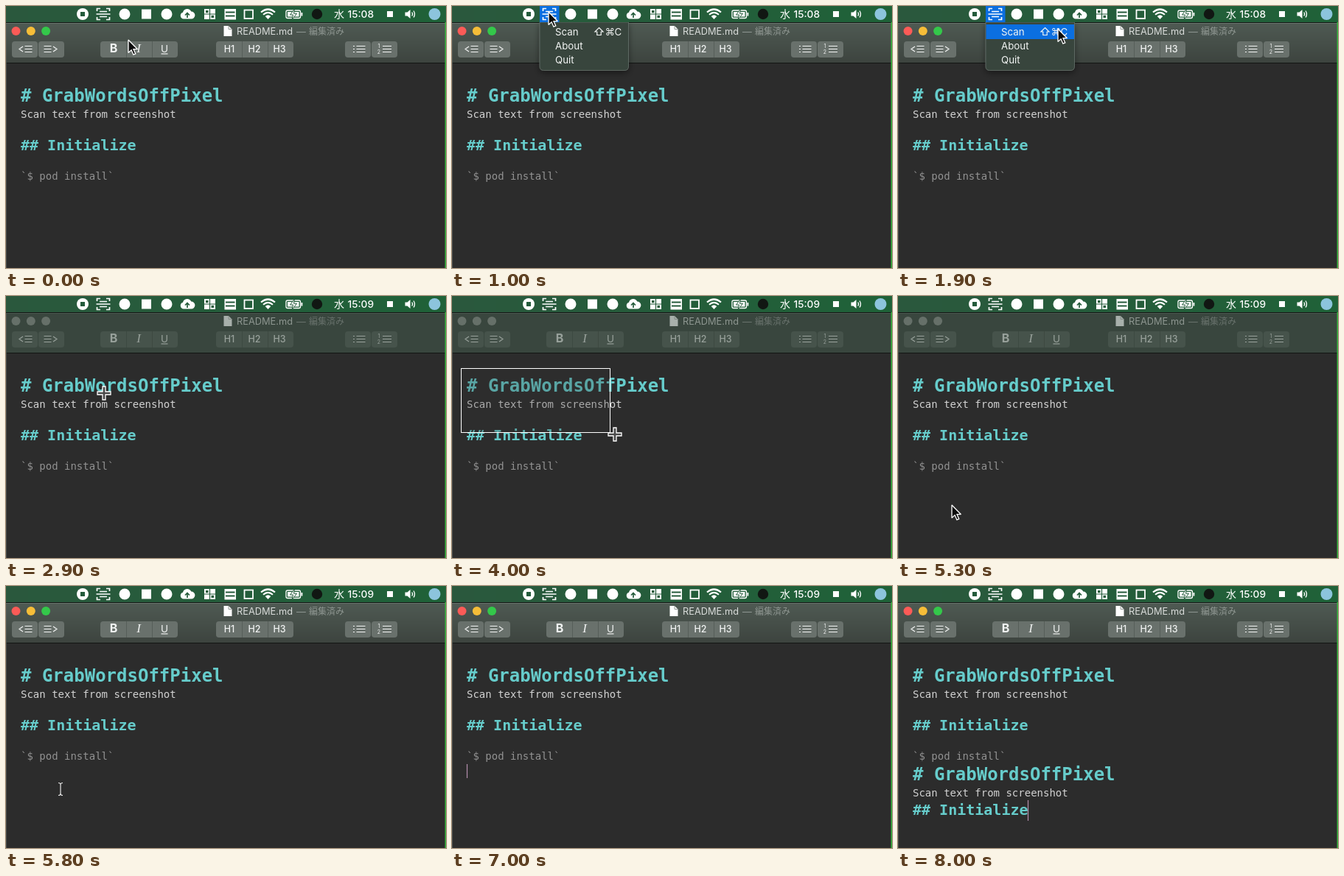
An HTML page for the animation above (8200 ms loop, 597 px wide and 356 px high).

```html
<!DOCTYPE html>
<html lang="ja">
<head>
<meta charset="utf-8">
<title>Screen capture demo</title>
<style>
html, body { margin: 0; width: 100%; height: 100%; overflow: hidden; background: #2c2c2c; }
svg { display: block; width: 597px; height: 356px; }
text { white-space: pre; }
.ui { font-family: Inter, "Noto Sans CJK JP", "Noto Sans CJK", sans-serif; }
.doc { font-family: "DejaVu Sans Mono", monospace; }
.h1 { font-size: 24px; font-weight: 700; fill: #66cccb; }
.h2 { font-size: 20px; font-weight: 700; fill: #66cccb; }
.p { font-size: 14px; fill: #d2d2d2; }
.code { font-size: 14px; fill: #929292; }
#win { --ink: #f1f3f2; --btn: #69716c; --title: #d9dcda; --note: #8e9691; --sep: #565e59; --page: #fff; --shine: #69746d; }
#win.idle { --ink: #98a19b; --btn: #46534b; --title: #8d9690; --note: #68726c; --sep: #3d4941; --page: #a8b0ab; --shine: #4a574f; }
.btn { fill: var(--btn); }
.ink { fill: var(--ink); }
.thin { fill: none; stroke: var(--ink); stroke-width: 1.2; }
.sep { stroke: var(--sep); }
.mid { text-anchor: middle; }
</style>
</head>
<body>
<svg viewBox="0 0 597 356" xmlns="http://www.w3.org/2000/svg">
  <defs>
    <filter id="soft" x="-20%" y="-20%" width="140%" height="150%">
      <feDropShadow dx="0" dy="3" stdDeviation="4" flood-opacity=".45"/>
    </filter>
  </defs>

  <g id="win">
    <rect y="22" width="597" height="334" fill="#2c2c2c"/>
    <rect y="22" width="597" height="55" fill="#39463e"/>
    <g id="titleFill"></g>
    <path d="M0 22.5H597M0 77.5H597" stroke="#121513"/>
    <path d="M0 23.5H597" stroke="var(--shine)"/>
    <path d="M.5 24V356" stroke="#555b57" opacity=".7"/>
    <path d="M596.3 22V356" stroke="#35b63c" stroke-width="1.4"/>
    <g id="lights"></g>
    <path d="M295.5 27H302L306.5 31.5V41H295.5Z" fill="var(--page)"/>
    <path d="M302 27V31.5H306.5" fill="none" stroke="#7c857f" stroke-width=".8"/>
    <g class="ui" font-size="12.8">
      <text x="313" y="38.5" fill="var(--title)">README.md</text>
      <text x="394" y="38.5" fill="var(--note)">—</text>
      <text x="411" y="38.5" font-size="12" fill="var(--note)">編集済み</text>
    </g>
    <g id="tools"></g>
  </g>

  <g id="page" class="doc"></g>
  <g id="pasted" class="doc"></g>
  <path id="caret" stroke="#b58fae" stroke-width="1.2"/>

  <g id="menu" class="ui" font-size="13.3" fill="#f2f4f3">
    <path d="M119 22H239.5V82Q239.5 87.5 234 87.5H124.5Q119 87.5 119 82Z" fill="#38443d" stroke="#68736c" stroke-width=".8" filter="url(#soft)"/>
    <rect id="pick" x="119.5" y="25" width="119.5" height="20" fill="#0b6fe0"/>
    <text x="140" y="39.5">Scan</text>
    <text x="140" y="59">About</text>
    <text x="140" y="78">Quit</text>
    <path d="M199.5 29.5L205 35H202.2V39.5H196.8V35H194Z" fill="none" stroke="#f2f4f3" stroke-width="1.2"/>
    <text x="207.5" y="39.5" style="font-family:'DejaVu Sans',sans-serif">⌘</text>
    <text x="220.5" y="39.5">C</text>
  </g>

  <g id="barFill"></g>
  <rect id="glow" x="119" width="26.5" height="22" fill="#0b6fe0"/>
  <g id="icons" fill="#fff"></g>
  <g class="ui" fill="#fff" font-weight="500">
    <text x="445" y="16" font-size="14">水</text>
    <text id="clock" x="463.5" y="16" font-size="13.7"></text>
  </g>

  <rect id="box" x="12.5" y="98.5" fill="#303030" fill-opacity=".25" stroke="#fff"/>
  <path id="arrow" d="M0 0V17.5L4.1 13.8 6.9 20.2 9.8 18.9 7 12.7H12.5Z" fill="#0c0c0c" stroke="#fff" stroke-width="1.3" stroke-miterlimit="2"/>
  <path id="cross" d="M-2-9H2V-2H9V2H2V9H-2V2H-9V-2H-2Z" fill="#4a4a4a" stroke="#fff" stroke-width="1.3"/>
  <path id="beam" d="M-3-8.5Q0-8.5 0-6V6Q0 8.5-3 8.5M3-8.5Q0-8.5 0-6M0 6Q0 8.5 3 8.5" fill="none" stroke="#e6e6e6" stroke-width="1.2"/>
</svg>

<script>
const $ = id => document.getElementById(id);
const LOOP = 8200, STEP = 100;
const NAME = '# GrabWordsOffPixel';
const LEAD = 'Scan text from screenshot';
const PART = '## Initialize';

const circle = (x, y, r, extra = '') => `<circle cx="${x}" cy="${y}" r="${r}" ${extra}/>`;
const rect = (x, y, w, h, extra = '') => `<rect x="${x}" y="${y}" width="${w}" height="${h}" ${extra}/>`;
const path = (d, extra = '') => `<path d="${d}" ${extra}/>`;
const stroke = (w, color = '#fff') => `fill="none" stroke="${color}" stroke-width="${w}"`;
const words = (cls, y, s) => `<text class="${cls}" x="20" y="${y}">${s}</text>`;

// Stepped colour ramp made of n bands
function ramp(n, from, to, band) {
  return Array.from({ length: n }, (_, i) => {
    const rgb = from.map((c, k) => Math.round(c + (to[k] - c) * i / (n - 1)));
    return band(i, `fill="rgb(${rgb})"`);
  }).join('');
}
$('titleFill').innerHTML = ramp(55, [79, 90, 83], [61, 68, 63], (i, fill) => rect(0, 22 + i, 597, 1, fill));
$('barFill').innerHTML = ramp(20, [42, 88, 61], [31, 98, 56], (i, fill) => rect(30 * i, 0, 30, 22, fill));

$('page').innerHTML = words('h1', 130, NAME) + words('p', 152, LEAD) +
  words('h2', 196, PART) + words('code', 236, '`$ pod install`');
$('pasted').innerHTML = words('h1', 264, NAME) + words('p', 286, LEAD) + words('h2', 311, PART);

// Toolbar
const button = (x, w) => rect(x, 48, w, 22, 'rx="4" class="btn"');
const label = (x, s, style, y = 62.5) => `<text class="ui ink mid" x="${x}" y="${y}" style='${style}'>${s}</text>`;
const bars = (x, w) => [54.5, 58.5, 62.5].map(y => `M${x} ${y}h${w}`).join('');
const split = x => path(`M${x} 48V70`, 'class="sep"');
const ink = d => path(d, 'class="thin"');

$('tools').innerHTML =
  [8, 44, 460, 496].map(x => button(x, 35)).join('') + button(128, 105) + button(285, 105) +
  [163.5, 198.5, 320.5, 355.5].map(split).join('') +
  ink('M23 55L18 58.5L23 62' + bars(25.5, 10)) +
  ink('M64 55L69 58.5L64 62' + bars(51.5, 10)) +
  label(146, 'B', 'font-size:16px;font-weight:700') +
  label(180, 'I', 'font:italic 17px "Liberation Serif",serif') +
  label(215, 'U', 'font-size:13.5px') + ink('M210.5 65H219.5') +
  ['H1', 'H2', 'H3'].map((s, i) => label(303 + 34 * i, s, 'font-size:12.5px;font-weight:500')).join('') +
  ink(bars(475.5, 12) + bars(471, 2) + bars(511, 12)) +
  label(506, '1', 'font-size:7px', 57) + label(506, '2', 'font-size:7px', 65);

// Menu bar
const dark = '#245b3b';
$('icons').innerHTML =
  circle(104, 11, 8) + rect(101, 8, 6, 6, `fill="${dark}"`) +
  path('M123.5 7V3.5H128M136 3.5H140.5V7M140.5 15V18.5H136M128 18.5H123.5V15M122.5 11H141.5M127 7.5H137M127 14.5H137', stroke(1.7)) +
  circle(161, 11, 7.5) + rect(184, 4.5, 13, 13) + circle(218, 11, 7.5) +
  path('M241 17.5A4.5 4.5 0 0 1 240 8.7A6 6 0 0 1 251.3 7.5A5 5 0 0 1 251.5 17.5Z') +
  path('M246 16V10M243 12.5L246 9.5L249 12.5', stroke(1.7, dark)) +
  rect(269, 4, 15, 14) + path('M276.5 4V18M269 11H284', stroke(1.2, dark)) +
  rect(271, 6, 3.5, 3.2, `fill="${dark}"`) + rect(278.5, 12.8, 3.5, 3.2, `fill="${dark}"`) +
  rect(296.5, 4, 15.5, 14.5) + path('M298 8.5H310.5M298 13.5H310.5', stroke(1.8, dark)) +
  rect(323.5, 5.5, 11.5, 11.5, stroke(1.8)) +
  path('M346 8.5Q355.5 .5 365 8.5M349 11.8Q355.5 6 362 11.8', stroke(2.2)) +
  path('M351.7 14Q355.5 10.5 359.3 14L355.5 18Z') +
  rect(380, 6, 19.5, 10.5, 'rx="2" ' + stroke(1.3)) + rect(382, 8, 15.5, 6.5) + rect(400.5, 9, 1.8, 4.5) +
  path('M391.5 4L385.5 12H389.5L388 18.5L394.5 10.2H390.5Z', `stroke="${dark}"`) +
  circle(422, 11, 7.2, 'fill="#111713"') +
  rect(517, 7, 8, 8) +
  path('M541.5 8.5H544.5L548.5 5V17L544.5 13.5H541.5Z') +
  path('M550.8 8.5Q552.5 11 550.8 13.5M553 6.5Q556 11 553 15.5', stroke(1.3)) +
  circle(581.5, 11, 8, 'fill="#8cc4dc"');

// Motion: keys are [time, x, y], eased between neighbours
const arrowKeys = [[0, 166, 46], [900, 131, 8], [1200, 131, 8], [1500, 160, 28], [1900, 217, 31],
  [4500, 300, 207], [4900, 300, 207], [5300, 73, 284]];
const crossKeys = [[2200, 217, 36], [2400, 190, 95], [2900, 133, 132], [3500, 12, 99], [3600, 12, 99],
  [4000, 221, 188], [4500, 300, 207]];
const beamKeys = [[5600, 73, 284], [5800, 74, 276]];

function at(keys, t) {
  const i = keys.findIndex(k => k[0] > t);
  if (i < 0) return keys[keys.length - 1].slice(1);
  if (i === 0) return keys[0].slice(1);
  const [t0, x0, y0] = keys[i - 1], [t1, x1, y1] = keys[i];
  const u = (t - t0) / (t1 - t0), e = (u + u * u * (3 - 2 * u)) / 2;
  return [x0 + (x1 - x0) * e, y0 + (y1 - y0) * e];
}

const within = (t, a, b) => t >= a && t < b;
const show = (id, on) => { $(id).style.display = on ? '' : 'none'; };
function place(id, keys, t, on) {
  show(id, on);
  const [x, y] = at(keys, t);
  $(id).setAttribute('transform', `translate(${x.toFixed(1)} ${y.toFixed(1)})`);
}

function draw(t) {
  const idle = within(t, 2200, 5600);
  $('win').setAttribute('class', idle ? 'idle' : '');
  show('titleFill', !idle);
  $('lights').innerHTML = ['#fc5b57', '#f6bd38', '#34c84a']
    .map((c, i) => circle(13.5 + 20.3 * i, 34, 6, `fill="${idle ? '#667069' : c}"`)).join('');
  $('clock').textContent = t < 2300 ? '15:08' : '15:09';

  const open = within(t, 1000, 2100);
  show('menu', open);
  show('glow', open);
  show('pick', open && at(arrowKeys, t)[1] >= 25);

  place('arrow', arrowKeys, t, t < 2200 || within(t, 4500, 5600));
  place('cross', crossKeys, t, within(t, 2200, 4500));
  place('beam', beamKeys, t, within(t, 5600, 6500));

  // The marquee trails the pointer slightly
  show('box', within(t, 3700, 4600));
  const [x, y] = at(crossKeys, t < 4500 ? Math.max(3600, t - 24) : t);
  $('box').setAttribute('width', Math.max(0, Math.round(x - 12)));
  $('box').setAttribute('height', Math.max(0, Math.round(y - 98)));

  const done = t >= 7100;
  show('pasted', done);
  show('caret', within(t, 6100, 6600) || within(t, 7000, 7600) || t >= 8000);
  $('caret').setAttribute('d', done ? 'M176.5 291V319' : 'M20.5 242V261');
}

const start = performance.now();
function tick() {
  const t = (performance.now() - start) % LOOP;
  draw(Math.floor(t / STEP) * STEP);
  requestAnimationFrame(tick);
}
tick();
</script>
</body>
</html>
```
